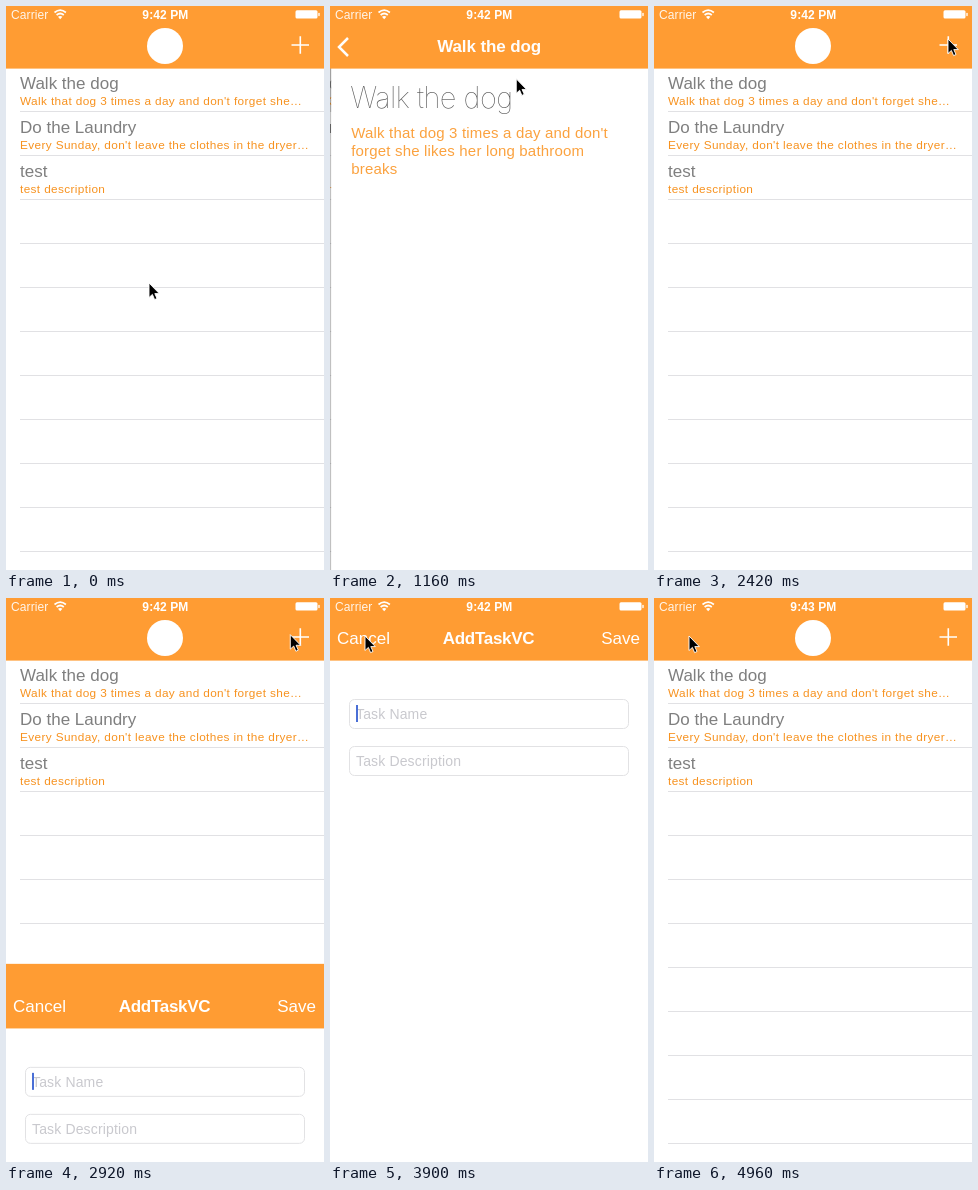
Recreate the animation shown at these times as an HTML page. Size 318 px wide and 564 px high, loop 4.98 s.

```html
<!DOCTYPE html>
<html lang="en">
<head>
<meta charset="utf-8">
<title>Task list</title>
<style>
html, body { margin: 0; width: 100%; height: 100%; overflow: hidden; background: #fff; }
svg { display: block; width: 318px; height: 564px; }
text { font: 17px "Liberation Sans", Arial, sans-serif; }
.bold { font-weight: bold; letter-spacing: -.1px; }
.name { fill: #7f7f7f; }
.note { font-size: 11.8px; letter-spacing: .37px; fill: #f7921f; }
.thin { font: 100 29px Inter, Roboto, sans-serif; letter-spacing: -.5px; fill: #555; }
.body { font-size: 15px; letter-spacing: .18px; fill: #fba23f; }
.status { font-size: 12px; letter-spacing: .1px; }
.hint { font-size: 14px; letter-spacing: .15px; fill: #c9c9ce; }
.mid { text-anchor: middle; }
.end { text-anchor: end; }
.field { fill: #fff; stroke: #e2e2e4; }
.line { fill: none; stroke: #fff; }
.bar { fill: #ff9c33; }
</style>
</head>
<body>
<svg viewBox="0 0 318 564">
  <defs>
    <linearGradient id="shade">
      <stop offset="0" stop-opacity="0"/>
      <stop offset="1" stop-opacity=".18"/>
    </linearGradient>
  </defs>

  <g id="list">
    <rect width="318" height="564" fill="#fff"/>
    <path id="rules" stroke="#e1e1e4"/>
    <rect id="pick" y="62" width="318" height="44" fill="#d6d6d6"/>
    <g id="rows"></g>
  </g>
  <rect id="dim" width="318" height="564"/>

  <g id="detail">
    <rect x="-9" width="9" height="564" fill="url(#shade)"/>
    <rect width="318" height="564" fill="#fff"/>
    <text class="thin" x="19" y="102">Walk the dog</text>
    <text class="body" x="20" y="132">Walk that dog 3 times a day and don't</text>
    <text class="body" x="20" y="150">forget she likes her long bathroom</text>
    <text class="body" x="20" y="168">breaks</text>
  </g>

  <rect class="bar" width="318" height="62.600"/>
  <g fill="#fff">
    <circle id="logo" cx="159" cy="40" r="18"/>
    <text id="title" class="bold mid" x="159" y="46">Walk the dog</text>
    <path id="back" class="line" stroke-width="2.500" d="M18 32l-9 9 9 9"/>
    <path id="plus" class="line" stroke-width="1.600" d="M285.500 39h17.500M294.300 30.300v17.500"/>
  </g>

  <g id="modal">
    <rect width="318" height="568" fill="#fff"/>
    <rect class="bar" width="318" height="64.600"/>
    <g fill="#fff">
      <text id="cancel" x="7" y="48">Cancel</text>
      <text class="bold mid" x="158.500" y="48" style="letter-spacing: -.3px">AddTaskVC</text>
      <text class="end" x="310" y="48">Save</text>
    </g>
    <rect class="field" x="19.500" y="103.500" width="279" height="29" rx="5"/>
    <rect class="field" x="19.500" y="150.500" width="279" height="29" rx="5"/>
    <text class="hint" x="26" y="123">Task Name</text>
    <text class="hint" x="26" y="170">Task Description</text>
    <rect x="26" y="109" width="2" height="17" fill="#4a6fd6"/>
  </g>

  <g fill="#fff">
    <text class="status" x="5" y="13" opacity=".9">Carrier</text>
    <path class="line" stroke-width="1.700" d="M48.500 6.500q5.700-4.600 11.400 0M50.600 9q3.600-3 7.200 0"/>
    <path d="M52 10.800q2.200-1.600 4.400 0l-2.200 2.400z"/>
    <text id="clock" class="status bold mid" x="159.400" y="13"></text>
    <rect x="289.500" y="4.300" width="22" height="8.200" rx="1.500"/>
    <rect x="312.300" y="6.800" width="1.400" height="3.400" rx=".7"/>
  </g>
  <path id="cursor" d="M0 0V14.500L3.400 11.400 5.600 16.600 8 15.500 5.800 10.600H10.300Z" stroke="#fff" stroke-width=".9"/>
</svg>

<script>
const $ = id => document.getElementById(id);
const LOOP = 4980;

const tasks = [
  ["Walk the dog", "Walk that dog 3 times a day and don't forget she…"],
  ["Do the Laundry", "Every Sunday, don't leave the clothes in the dryer…"],
  ["test", "test description"]
];
$("rows").innerHTML = tasks.map(([name, note], i) =>
  `<text class="name" x="14" y="${83 + 44 * i}">${name}</text>
   <text class="note" x="14" y="${99 + 44 * i}">${note}</text>`).join("");

let rules = "";
for (let y = 105.5; y < 564; y += 44) rules += `M14 ${y}h304`;
$("rules").setAttribute("d", rules);

// time, x, y of the pointer
const path = [
  [0, 143, 277], [60, 143, 277], [560, 196, 80], [700, 198, 75], [1080, 198, 75],
  [1600, 18, 42], [1760, 14, 40], [1860, 115, 97], [2340, 294, 33], [2860, 294, 33],
  [3280, 124, 97], [3760, 35, 38], [LOOP, 35, 38]
];

function pointer(t) {
  const i = path.findIndex(k => k[0] > t);
  const [t0, x0, y0] = path[i - 1], [t1, x1, y1] = path[i];
  const u = (t - t0) / (t1 - t0), e = u * u * (3 - 2 * u);
  return [x0 + (x1 - x0) * e, y0 + (y1 - y0) * e];
}

// critically damped spring from 0 to 1, at rest once it is within a pixel
function spring(t, start) {
  const w = Math.max(0, t - start) * 0.01826;
  return w > 9 ? 1 : 1 - (1 + w) * Math.exp(-w);
}

const move = (id, x, y) => $(id).setAttribute("transform", `translate(${x} ${y})`);
const fade = (id, a) => $(id).setAttribute("opacity", Math.max(0, Math.min(1, a)));

function draw(now) {
  const t = now % LOOP;
  const pop = spring(t, 1819.6);
  const push = spring(t, 738) - pop;
  const x = 318 * (1 - push);

  move("list", -95.4 * push, 0);
  fade("dim", 0.1 * push);
  fade("pick", t < 690 ? 0 : 1 - 4 * pop);
  move("detail", x, 0);
  fade("detail", push * 50);

  move("logo", -57 * push, 0);
  fade("logo", 1 - 1.25 * push);
  fade("plus", 1 - 1.35 * push);
  move("title", 27 * (x / 56) ** 1.31, 0);
  fade("title", push ** 2.8);
  fade("back", (push - 0.8) / 0.2);

  move("modal", 0, 566 - 568 * (spring(t, 2853) - spring(t, 4035.8)));
  fade("cancel", t > 3950 ? 0.45 : 1);
  $("clock").textContent = t < 4500 ? "9:42 PM" : "9:43 PM";
  move("cursor", ...pointer(t));
}

const began = performance.now();
function tick() {
  draw(performance.now() - began);
  requestAnimationFrame(tick);
}
tick();
</script>
</body>
</html>
```
